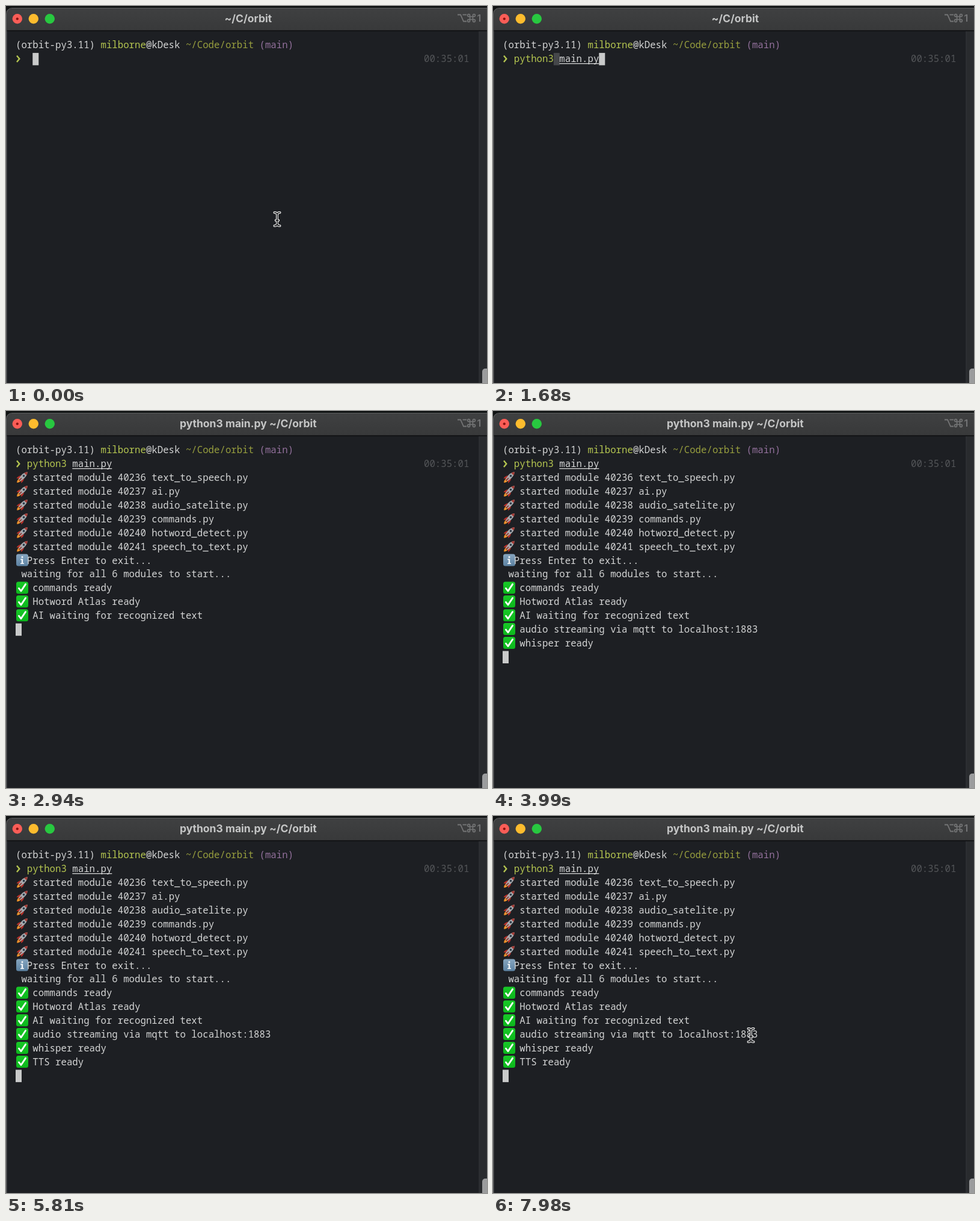
These frames come from a looping animation (800 px wide and 626 px high, 8000 ms). An HTML page with a canvas:

```html
<!DOCTYPE html>
<html lang="en">
<head>
<meta charset="utf-8">
<title>Terminal</title>
<style>
  html, body { margin: 0; width: 100%; height: 100%; overflow: hidden; background: #1d1f23; }
  canvas { display: block; width: 800px; height: 626px; }
</style>
</head>
<body>
<canvas id="stage" width="800" height="626"></canvas>
<script>
const ctx = document.getElementById('stage').getContext('2d');
const LOOP = 8000, STEP = 70;
const LEFT = 16, COL = 9.43, ROW = 22.9;
const MONO = '500 15.72px "Noto Sans Mono", monospace';
const COMMAND = 'python3 main.py';
const WORD = 7;
const ENTER = 1890;
const INK = '#d4d5d5', LIME = '#b4c550';

const output = [
  ...['40236 text_to_speech', '40237 ai', '40238 audio_satelite', '40239 commands',
      '40240 hotword_detect', '40241 speech_to_text']
    .map(name => ({ at: 2030, icon: rocket, col: 3, text: `started module ${name}.py` })),
  { at: 2030, icon: info, col: 2, text: 'Press Enter to exit...' },
  { at: 2030, col: 1, text: 'waiting for all 6 modules to start...' },
  { at: 2450, icon: check, col: 3, text: 'commands ready' },
  { at: 2730, icon: check, col: 3, text: 'Hotword Atlas ready' },
  { at: 2870, icon: check, col: 3, text: 'AI waiting for recognized text' },
  { at: 3220, icon: check, col: 3, text: 'audio streaming via mqtt to localhost:1883' },
  { at: 3990, icon: check, col: 3, text: 'whisper ready' },
  { at: 4900, icon: check, col: 3, text: 'TTS ready' }
];

const colX = col => LEFT + col * COL;

function write(text, col, row, color) {
  ctx.font = MONO;
  ctx.textAlign = 'left';
  ctx.fillStyle = color;
  ctx.fillText(text, colX(col), 70.3 + row * ROW);
}

function block(col, row, color) {
  ctx.fillStyle = color;
  ctx.fillRect(colX(col), 55 + row * ROW, 10, 20.5);
}

function disc(x, y, r, color) {
  ctx.fillStyle = color;
  ctx.beginPath();
  ctx.arc(x, y, r, 0, Math.PI * 2);
  ctx.fill();
}

function roundBox(x, y, w, h, r, color) {
  ctx.fillStyle = color;
  ctx.beginPath();
  ctx.roundRect(x, y, w, h, r);
  ctx.fill();
}

function line(points, width, color) {
  ctx.strokeStyle = color;
  ctx.lineWidth = width;
  ctx.beginPath();
  points.forEach(([x, y]) => ctx.lineTo(x, y));
  ctx.stroke();
}

function fillPath(d, color) {
  ctx.fillStyle = color;
  ctx.fill(new Path2D(d));
}

function shade(top, bottom, y0 = -10, y1 = 10) {
  const gradient = ctx.createLinearGradient(0, y0, 0, y1);
  gradient.addColorStop(0, top);
  gradient.addColorStop(1, bottom);
  return gradient;
}

// Icons are drawn around their own centre.
function rocket() {
  ctx.rotate(Math.PI / 4);
  fillPath('M-2.6 5 Q-3 10 0 12.5 Q3 10 2.6 5Z', '#e98a24');
  fillPath('M-1.2 5 Q-1 9 0 10 Q1 9 1.2 5Z', '#fbd45a');
  fillPath('M-3 -1 Q-6.5 2 -5.5 8 L-2 5Z M3 -1 Q6.5 2 5.5 8 L2 5Z', '#b3302a');
  fillPath('M0 -12.5 Q-3.8 -8 -3.5 -1 L-2.4 6 H2.4 L3.5 -1 Q3.8 -8 0 -12.5Z', '#a6aaae');
  fillPath('M0 -12.5 Q-2.2 -10 -2.9 -7.4 H2.9 Q2.2 -10 0 -12.5Z', '#a63c36');
  disc(0, -3.6, 1.8, '#2b3a48');
  fillPath('M-.8 1.5 H.8 V8 H-.8Z', '#8f2926');
}

function info() {
  roundBox(-10, -10, 20, 20, 3.5, shade('#86a5bf', '#5c82a2'));
  disc(0, -5, 1.5, '#f4f7f9');
  fillPath('M-2.8 -2 H1.2 V4.8 H3 V6.4 H-3 V4.8 H-1.1 V-.4 H-2.8Z', '#f4f7f9');
}

function check() {
  roundBox(-10, -10, 20, 20, 3.5, shade('#18c827', '#0cb71c'));
  ctx.lineCap = ctx.lineJoin = 'round';
  line([[-5.6, 1], [-2, 5.6], [5.6, -5.8]], 2.8, '#fff');
}

function drawIcon(icon, row) {
  ctx.save();
  ctx.translate(27, 64.4 + row * ROW);
  icon();
  ctx.restore();
}

function shortcut() {
  const gray = '#747576';
  ctx.save();
  ctx.lineCap = 'butt';
  line([[751, 14.5], [756, 14.5], [761, 25.5], [766, 25.5]], 1.8, gray);
  line([[759.5, 14.5], [766, 14.5]], 1.8, gray);
  ctx.lineWidth = 1.6;
  ctx.strokeRect(771.6, 17.6, 4.8, 4.8);
  for (const sx of [-1, 1]) for (const sy of [-1, 1]) {
    ctx.beginPath();
    ctx.arc(774 + sx * 4.4, 20 + sy * 4.4, 2, 0, Math.PI * 2);
    ctx.stroke();
  }
  ctx.restore();
  ctx.font = '600 16px Inter, sans-serif';
  ctx.textAlign = 'left';
  ctx.fillStyle = gray;
  ctx.fillText('1', 783.5, 26);
}

function windowFrame(title) {
  ctx.fillStyle = '#101313';
  ctx.fillRect(0, 0, 800, 626);
  roundBox(0, 3, 820, 650, 10, '#5d5e5f');
  roundBox(1.5, 4, 820, 650, 9, '#1d1f23');
  roundBox(1.5, 4, 820, 36.5, [9, 0, 0, 0], shade('#3f4041', '#38393a', 4, 41));
  ctx.fillStyle = '#0c0d0e';
  ctx.fillRect(1.5, 40.5, 799, 1.3);

  ctx.fillStyle = '#292b2e';
  ctx.fillRect(787, 42, 13, 584);
  ctx.fillStyle = '#34363a';
  ctx.fillRect(786.5, 42, 1, 584);
  roundBox(792, 602, 12, 40, 5, '#9b9c9d');

  disc(18.8, 21.3, 8.2, '#fb5d57');
  disc(18.8, 21.3, 2.1, '#86110f');
  disc(45.8, 21.3, 8.2, '#fdbc2e');
  disc(72.8, 21.3, 8.2, '#28c840');

  ctx.font = 'bold 17.5px Inter, sans-serif';
  ctx.textAlign = 'center';
  ctx.fillStyle = '#c5c6c6';
  ctx.fillText(title, 402.8, 27);
  shortcut();
}

function typedCount(t) {
  if (t < STEP) return 0;
  if (t < 1050) return Math.min(WORD, 1 + Math.floor(t / STEP));
  return Math.min(COMMAND.length, WORD + 1 + Math.floor((t - 1050) / STEP));
}

function prompt(t) {
  write('(orbit-py3.11)', 0, 0, INK);
  write('milborne', 15, 0, LIME);
  write('@kDesk', 23, 0, INK);
  write('~/Code/orbit', 30, 0, '#979e3e');
  write('(main)', 43, 0, '#93719c');
  write('00:35:01', 72, 1, '#535558');
  ctx.lineCap = 'butt';
  ctx.lineJoin = 'miter';
  line([[18, 82.5], [22.3, 87.7], [18, 93]], 2.4, LIME);

  const count = typedCount(t);
  // Dim trace left where the cursor rested.
  if (count > WORD && t < ENTER) block(2 + WORD, 1, '#45474a');
  write(COMMAND.slice(0, Math.min(count, WORD)), 2, 1, LIME);
  const path = COMMAND.slice(WORD + 1, count);
  write(path, 3 + WORD, 1, INK);
  ctx.fillStyle = INK;
  ctx.fillRect(colX(3 + WORD), 95, path.length * COL, 1.3);
  if (t < ENTER) block(Math.max(3, 2 + count), 1, '#c9caca');
}

function pointer(x, y) {
  ctx.save();
  ctx.translate(x, y);
  ctx.lineCap = ctx.lineJoin = 'round';
  const beam = new Path2D('M-4.5 -11 Q-.5 -11 0 -8 Q.5 -11 4.5 -11 M0 -8 V8 M-4.5 11 Q-.5 11 0 8 Q.5 11 4.5 11 M-2.2 2 H2.2');
  for (const [width, color] of [[4, '#f2f2f2'], [1.6, '#151618']]) {
    ctx.lineWidth = width;
    ctx.strokeStyle = color;
    ctx.stroke(beam);
  }
  ctx.restore();
}

function draw(time) {
  const t = Math.floor((time % LOOP) / STEP) * STEP;
  const running = t >= ENTER;
  windowFrame(running ? COMMAND + ' ~/C/orbit' : '~/C/orbit');
  prompt(t);

  if (running) {
    const shown = output.filter(entry => t >= entry.at);
    shown.forEach((entry, i) => {
      if (entry.icon) drawIcon(entry.icon, i + 2);
      write(entry.text, entry.col, i + 2, INK);
    });
    block(0, shown.length + 2, '#c9caca');
  }

  if (t < STEP) pointer(451, 354);
  if (t >= 7770) {
    const k = (t - 7770) / 210;
    pointer(451 - 22 * k, 354 + 10 * k);
  }
}

const start = performance.now();
function tick() {
  draw(performance.now() - start);
  requestAnimationFrame(tick);
}
tick();
</script>
</body>
</html>
```
